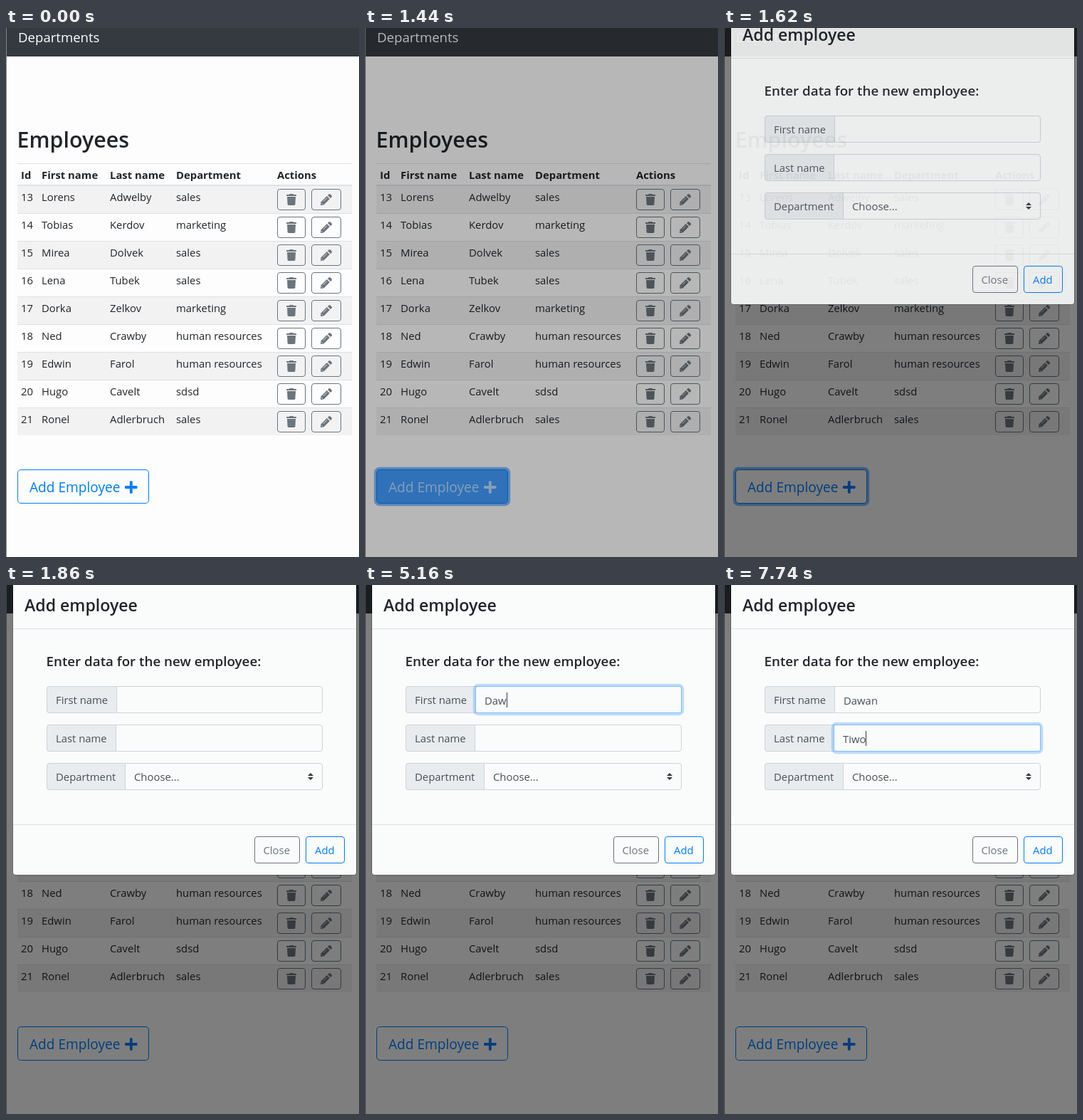
Write an HTML page that moves like this. It is 496 px wide and 743 px high and loops after 8000 ms.

```html
<!DOCTYPE html>
<html lang="en">
<head>
<meta charset="utf-8">
<title>Employees</title>
<style>
  html, body { margin: 0; width: 100%; height: 100%; overflow: hidden; background: #fdfdfd; }
  svg { display: block; width: 496px; height: 743px; }
  text { font-family: "Open Sans", "Noto Sans", sans-serif; font-size: 14.85px; fill: #212529; white-space: pre; }
  .bold { font-weight: 700; }
  .semi { font-weight: 600; }
</style>
</head>
<body>
<svg id="stage" viewBox="0 0 496 743" xmlns="http://www.w3.org/2000/svg">
  <defs>
    <g id="trash" fill="#6c757d">
      <path d="M-6.5 -7H-3.2L-2.4 -8H2.4L3.2 -7H6.5Q7 -7 7 -6.5V-5H-7V-6.5Q-7 -7 -6.5 -7Z"/>
      <path d="M-6 -4H6L5.4 6.6Q5.3 8 3.9 8H-3.9Q-5.3 8 -5.4 6.6Z"/>
    </g>
    <g id="pencil" fill="#6c757d">
      <path d="M0.9 -4.9L4.9 -0.9L-3.3 7.3L-7.1 8Q-8.1 8.1 -8 7.1L-7.3 3.3Z"/>
      <path d="M2 -6L3.6 -7.6Q4.6 -8.5 5.6 -7.6L7.6 -5.6Q8.5 -4.6 7.6 -3.6L6 -2Z"/>
      <path d="M-4.2 2.8L1 -2.4M-6.4 5.2L-5.2 6.4" stroke="#fafafa" stroke-width=".8"/>
    </g>
  </defs>
  <rect width="496" height="743" fill="#fdfdfd"/>
  <rect width="496" height="40" fill="#343a40"/>
  <rect width="1" height="743" fill="#85898c"/>
  <g id="page"></g>
  <rect id="backdrop" width="496" height="743"/>
  <g id="modal"></g>
</svg>
<script>
const LOOP = 8000, STEP = 60;
const BLUE = [0, 123, 255], PAPER = [253, 253, 253];
const page = document.getElementById("page");
const modal = document.getElementById("modal");
const backdrop = document.getElementById("backdrop");

function add(parent, tag, attrs, content) {
  const el = document.createElementNS("http://www.w3.org/2000/svg", tag);
  set(el, attrs);
  if (content !== undefined) el.textContent = content;
  return parent.appendChild(el);
}
function set(el, attrs) {
  for (const key in attrs) el.setAttribute(key, attrs[key]);
}
const label = (parent, x, y, str, attrs = {}) => add(parent, "text", { x, y, ...attrs }, str);
const fillBox = (parent, x, y, width, height, fill) => add(parent, "rect", { x, y, width, height, fill });

// Rectangle with a one-pixel border inside its bounds
function box(parent, x, y, w, h, stroke, fill = "none", rx = 4) {
  return add(parent, "rect", { x: x + .5, y: y + .5, width: w - 1, height: h - 1, rx: rx - .5, stroke, fill });
}
// Focus glow behind a control; its spread and strength grow together
function glow(parent, x, y, w, h, alpha) {
  const el = add(parent, "rect", { fill: `rgba(0,123,255,${alpha})` });
  return p => {
    const s = 3.2 * p;
    set(el, { x: x - s, y: y - s, width: w + 2 * s, height: h + 2 * s, rx: 4 + s, opacity: p });
  };
}

// Page
label(page, 17, 20, "Departments", { style: "font-size:18.6px;fill:#fff" });
label(page, 15.5, 168, "Employees", { class: "semi", style: "font-size:30.4px" });

const columns = [21, 50, 146, 239, 381];
const people = [
  ["Lorens", "Adwelby", "sales"],
  ["Tobias", "Kerdov", "marketing"],
  ["Mirea", "Dolvek", "sales"],
  ["Lena", "Tubek", "sales"],
  ["Dorka", "Zelkov", "marketing"],
  ["Ned", "Crawby", "human resources"],
  ["Edwin", "Farol", "human resources"],
  ["Hugo", "Cavelt", "sdsd"],
  ["Ronel", "Adlerbruch", "sales"]
];
fillBox(page, 16, 190, 470, 1, "#dee2e6");
["Id", "First name", "Last name", "Department", "Actions"].forEach((str, i) =>
  label(page, columns[i], 212, str, { class: "bold" }));
people.forEach((person, i) => {
  const y = 221 + 39 * i;
  if (i % 2 === 0) fillBox(page, 16, y, 470, 39, "#f2f2f3");
  if (i) fillBox(page, 16, y, 470, 1, "#dee2e6");
  [13 + i, ...person].forEach((str, c) => label(page, columns[c], y + 22, str));
  box(page, 381, y + 5, 40, 30, "#6c757d");
  box(page, 429, y + 5, 42, 30, "#6c757d");
  add(page, "use", { href: "#trash", x: 401, y: y + 20 });
  add(page, "use", { href: "#pencil", x: 450, y: y + 20 });
});
fillBox(page, 16, 220, 470, 2, "#dee2e6");

const openGlow = glow(page, 16, 620, 185, 48, .5);
const openFill = box(page, 16, 620, 185, 48, "#007bff", "none", 4.8);
const openText = label(page, 33, 652, "Add Employee");
const openPlus = add(page, "g", {});
add(openPlus, "rect", { x: 167, y: 643.1, width: 17.5, height: 3.8, rx: 1.2 });
add(openPlus, "rect", { x: 173.9, y: 636.2, width: 3.8, height: 17.5, rx: 1.2 });

// Dialog: the border lies around the white area
box(modal, 9, -60, 484, 468, "rgba(0,0,0,.2)", "none", 4.8);
add(modal, "rect", { x: 10, y: -59, width: 482, height: 466, rx: 3.8, fill: "#fafbfb" });
label(modal, 26, 37, "Add employee", { class: "semi", style: "font-size:23.1px" });
label(modal, 56.5, 114, "Enter data for the new employee:", { class: "semi", style: "font-size:18.8px" });
fillBox(modal, 10, 61, 482, 1, "#dee2e6");
fillBox(modal, 10, 336, 482, 1, "#dee2e6");

function field(y, split, name) {
  box(modal, 57, y, 388, 38, "#ced4da", "#fafbfb");
  add(modal, "path", {
    d: `M${split + .5} ${y + .5}H61Q57.5 ${y + .5} 57.5 ${y + 4}V${y + 34}Q57.5 ${y + 37.5} 61 ${y + 37.5}H${split + .5}Z`,
    fill: "#e9ecef", stroke: "#ced4da"
  });
  label(modal, 70, y + 25, name, { style: "fill:#495057" });
}
function textField(y, split, name) {
  field(y, split, name);
  const w = 445 - split;
  const halo = glow(modal, split, y, w, 38, .25);
  const frame = box(modal, split, y, w, 38, "#80bdff", "#fafbfb", 3);
  const value = label(modal, split + 13, y + 26, "", { style: "fill:#495057" });
  const caret = fillBox(modal, 0, y + 9, 1, 21, "#333a40");
  const focus = p => { halo(p); set(frame, { opacity: p }); };
  return { focus, value, caret, x: split + 13 };
}
const fields = [textField(142, 155, "First name"), textField(196, 154, "Last name")];
field(250, 167, "Department");
label(modal, 180, 275, "Choose...", { style: "fill:#495057" });
add(modal, "path", { d: "M428 264L424 268H432ZM428 274L424 270H432Z", fill: "#343a40" });
box(modal, 349, 353, 64, 38, "#6c757d");
label(modal, 361.5, 378, "Close", { style: "fill:#6c757d" });
box(modal, 421, 353, 55, 38, "#007bff");
label(modal, 434, 378, "Add", { style: "fill:#007bff" });

// Typing: [time, letters shown, caret visible]
const names = ["Dawan", "Tiwo"];
const typing = [
  [[0, 0, 0], [2640, 0, 1], [3120, 0, 0], [3660, 0, 1], [4140, 0, 0], [4200, 1, 1], [4680, 1, 0],
   [4980, 2, 1], [5160, 3, 1], [5340, 4, 1], [5460, 5, 1], [5880, 5, 0]],
  [[0, 0, 0], [5940, 0, 1], [6420, 0, 0], [6480, 1, 1], [7020, 1, 0], [7140, 2, 1], [7440, 3, 1], [7740, 4, 1]]
];

const ramp = (t, start, length) => Math.min(1, Math.max(0, (t - start) / length));
const smooth = p => p * p * (3 - 2 * p);
const mix = (a, b, p) => `rgb(${a.map((v, i) => Math.round(v + (b[i] - v) * p))})`;

// cubic-bezier(0, 0, .58, 1)
function easeOut(x) {
  let lo = 0, hi = 1;
  for (let i = 0; i < 20; i++) {
    const s = (lo + hi) / 2;
    if (1.74 * (1 - s) * s * s + s ** 3 < x) lo = s; else hi = s;
  }
  return 3 * (1 - lo) * lo * lo + lo ** 3;
}

function draw(time) {
  const t = Math.floor(time / STEP) * STEP;

  const hover = smooth(ramp(t, 990, 150)) - smooth(ramp(t, 1390, 150));
  const ink = mix(BLUE, PAPER, hover);
  set(openFill, { fill: mix(PAPER, BLUE, hover) });
  openText.style.cssText = `font-size:19.1px;fill:${ink}`;
  set(openPlus, { fill: ink });
  openGlow(smooth(ramp(t, 1220, 150)) - ramp(t, 1740, 120));

  set(backdrop, { opacity: .5 * ramp(t, 1356, 150) });
  const slide = -50 * (1 - easeOut(ramp(t, 1486, 300)));
  set(modal, { opacity: ramp(t, 1486, 150), transform: `translate(0 ${Math.round(slide)})` });

  const swap = ramp(t, 5900, 150);
  fields[0].focus(ramp(t, 2610, 150) - swap);
  fields[1].focus(swap);
  fields.forEach((f, i) => {
    const [, count, on] = typing[i].filter(entry => entry[0] <= t).pop();
    f.value.textContent = names[i].slice(0, count);
    const end = count ? f.value.getComputedTextLength() : 0;
    set(f.caret, { x: Math.round(f.x + end), opacity: on });
  });
}

const origin = performance.now();
function tick() {
  draw((performance.now() - origin) % LOOP);
  requestAnimationFrame(tick);
}
tick();
</script>
</body>
</html>
```
